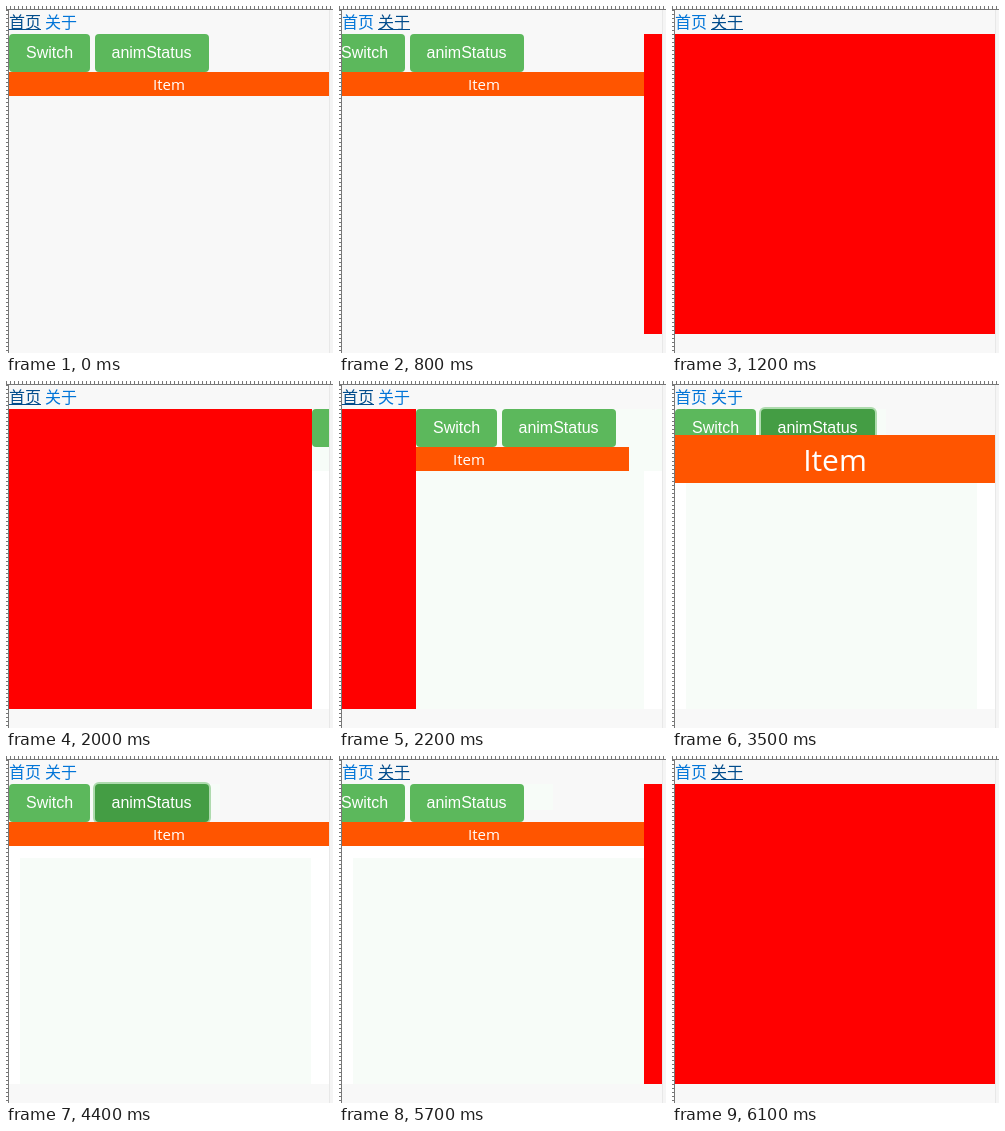
An HTML page for the animation above (6600 ms loop, 327 by 347 pixels).

```html
<!DOCTYPE html>
<html lang="zh">
<head>
<meta charset="utf-8">
<style>
  html, body { margin: 0; width: 100%; height: 100%; overflow: hidden; background: #f8f8f8; }
  svg { display: block; }
  text { font: 16px "Liberation Sans", Arial, sans-serif; fill: #fff; }
  .link text { font: 300 16px "Noto Sans CJK SC", "Noto Sans CJK", sans-serif; fill: #0275d8; }
  .link path { stroke: #014c8c; visibility: hidden; }
  .link.hover text { fill: #014c8c; }
  .link.hover path { visibility: visible; }
  #item text { font: 15px "Open Sans", "Noto Sans", sans-serif; text-anchor: middle; }
</style>
</head>
<body>
<svg width="327" height="347" viewBox="0 0 327 347">
  <defs>
    <clipPath id="view"><path d="M3 26h320v302H3z"/></clipPath>
  </defs>
  <rect width="327" height="347" fill="#f8f8f8"/>

  <g clip-path="url(#view)">
    <g id="backdrop">
      <rect x="3" y="90" width="320" height="238" fill="#fff"/>
      <rect x="14" y="90" width="291" height="238" fill="#f7fcf8"/>
      <rect id="topTint" x="14" y="28" fill="#f7fcf8"/>
      <rect id="band" x="3" y="90" width="320" height="12" fill="#fff"/>
    </g>
    <g id="home">
      <rect x="3" y="28" width="81" height="38" rx="4" fill="#5cb85c"/>
      <text x="20" y="52">Switch</text>
      <rect id="ring" x="87" y="26" width="118" height="42" rx="6" fill="#aedbae"/>
      <rect id="status" x="89" y="28" width="114" height="38" rx="4"/>
      <text x="105.5" y="52">animStatus</text>
      <g id="item">
        <rect x="3" y="66" width="320" height="24" fill="#ff5500"/>
        <text x="163" y="84">Item</text>
      </g>
    </g>
    <rect id="about" x="3" y="28" width="320" height="300" fill="#f00"/>
  </g>

  <g class="link" id="homeLink"><text x="3" y="22">首页</text><path d="M3 23.5h32"/></g>
  <g class="link" id="aboutLink"><text x="39" y="22">关于</text><path d="M39 23.5h32"/></g>

  <path d="M0 0h327v4H0zM0 0h3v347H0z" fill="#fff"/>
  <path d="M0 1.5h327" stroke="#777" stroke-width="3" stroke-dasharray="1 3"/>
  <path d="M1 4v343" stroke="#777" stroke-width="2" stroke-dasharray="1 3"/>
  <path d="M0 3.5h327M2.5 3v344" stroke="#777"/>
  <path d="M323.5 4v343" stroke="#e8e8e8"/>
  <path d="M325.5 4v343" stroke="#f5f5f5" stroke-width="3"/>
</svg>
<script>
const LOOP = 6600, STEP = 100, DURATION = 500, WIDTH = 320;
const $ = id => document.getElementById(id);
const set = (id, attrs) => {
  for (const name in attrs) $(id).setAttribute(name, attrs[name]);
};
const show = (id, on) => set(id, { visibility: on ? 'visible' : 'hidden' });

// cubic-bezier(.25, .1, .25, 1)
function ease(x) {
  if (x <= 0) return 0;
  if (x >= 1) return 1;
  let lo = 0, hi = 1;
  for (let i = 0; i < 24; i++) {
    const s = (lo + hi) / 2;
    if (0.75 * s * (1 - s) + s ** 3 < x) lo = s; else hi = s;
  }
  return 0.3 * lo * (1 - lo) ** 2 + 3 * lo * lo * (1 - lo) + lo ** 3;
}

// Five visible steps per transition; phase is the time already elapsed at the first
function progress(t, start, phase) {
  const step = Math.floor((t - start) / STEP);
  if (step < 0) return 0;
  return step >= 4 ? 1 : ease((step * STEP + phase) / DURATION);
}

function draw(t) {
  const returning = t >= 2000 && t < 5700;
  const p = returning ? progress(t, 2000, 34) : progress(t, t < 2000 ? 800 : 5700, 36);
  const homeX = Math.round(WIDTH * (returning ? 1 - p : -p));
  const aboutX = homeX + (returning ? -WIDTH : WIDTH);
  set('home', { transform: `translate(${homeX})` });
  set('about', { transform: `translate(${aboutX})` });

  const enterX = returning ? Math.round(WIDTH * (progress(t, 2000, -6) - 1)) : 0;
  const scale = 1 + progress(t, 3100, 0) - progress(t, 4000, 35);
  set('item', { transform: `translate(${163 + enterX} 78) scale(${scale}) translate(-163 -78)` });

  const focused = t >= 3200 && t < 5200;
  const fading = t >= 3100 && t < 5300;
  show('ring', focused);
  set('status', { fill: focused ? '#449d44' : fading ? '#58b358' : '#5cb85c' });

  $('homeLink').classList.toggle('hover', t < 700 || t >= 2000 && t < 3100);
  $('aboutLink').classList.toggle('hover', t >= 700 && t < 2000 || t >= 5300);

  set('backdrop', { display: t < 2000 ? 'none' : 'inline' });
  set('topTint', { width: t < 2400 ? 309 : 200, height: t < 2400 ? 62 : t < 3200 ? 38 : 26 });
  set('band', { display: t < 3200 ? 'none' : 'inline' });
}

const began = performance.now();
function tick() {
  draw((performance.now() - began) % LOOP);
  requestAnimationFrame(tick);
}
tick();
</script>
</body>
</html>
```
